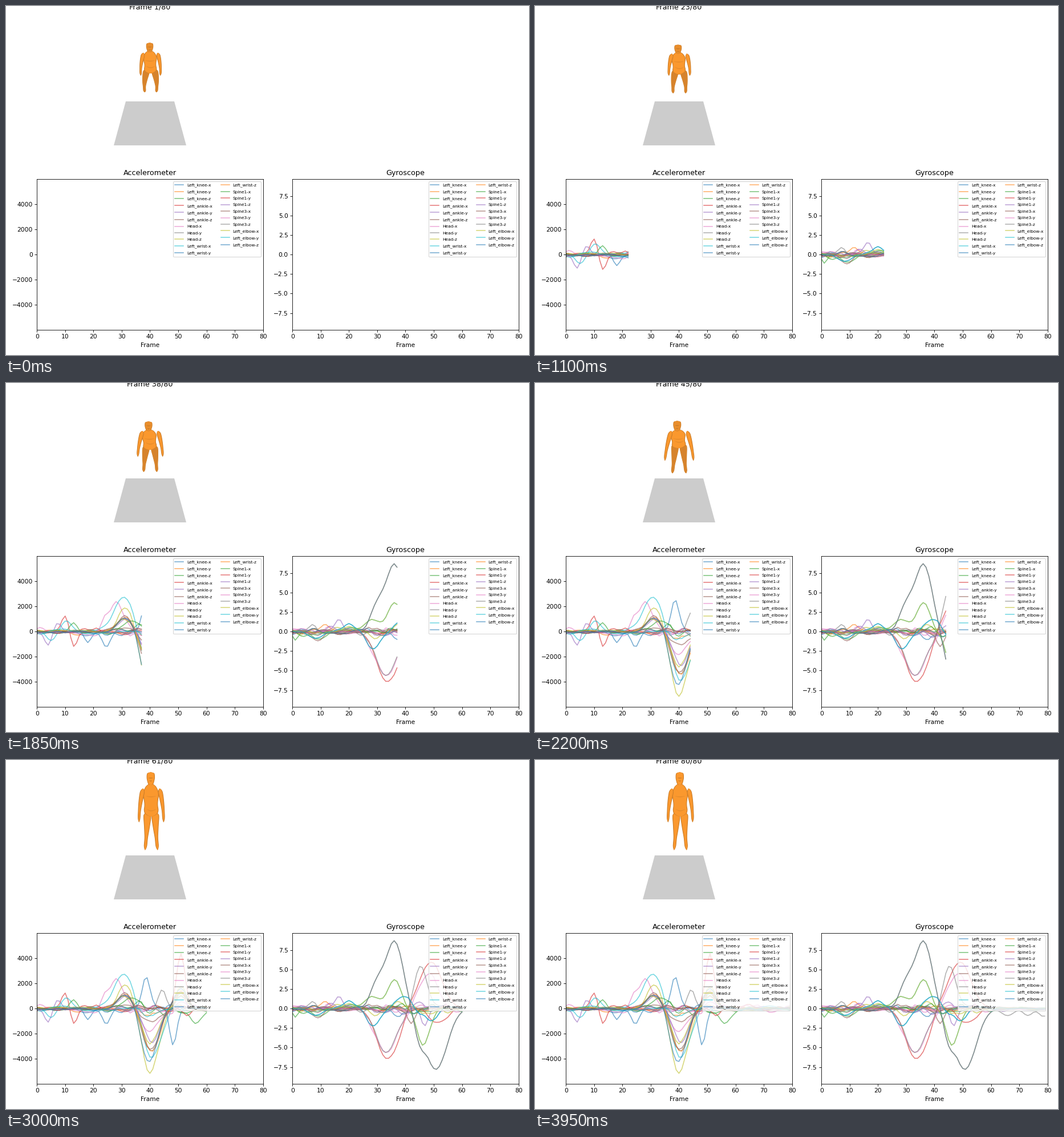
A matplotlib script that plays this animation: 917 by 611 pixels, repeating every 4 s.

```python
import numpy as np
import matplotlib.pyplot as plt
from matplotlib.animation import FuncAnimation
from matplotlib.collections import PolyCollection

W, H, DPI, N = 917, 611, 76.4, 80
SENSORS = ["Left_knee", "Left_ankle", "Head", "Left_wrist", "Spine1", "Spine3", "Left_elbow"]
LABELS = [f"{s}-{a}" for s in SENSORS for a in "xyz"]
T = np.arange(N)
rng = np.random.default_rng(7)


def ease(u):
    u = np.clip(u, 0, 1)
    return u * u * (3 - 2 * u)


def bump(t, width, height):
    return height * np.exp(-((T - t) / width) ** 2 / 2)


def noise(base, burst):
    """One smooth random wave per label, livelier around the stand-up."""
    level = base + bump(42, 9, burst)
    kernel = np.array([0.3, 0.55, 0.55, 0.3])
    return {s: level * np.convolve(rng.normal(size=N + 3), kernel, "valid") for s in LABELS}


def add_bumps(data, bumps):
    for name, parts in bumps.items():
        data[name] = 0.5 * data[name] + sum(bump(*p) for p in parts)


# Standing up: each axis rises a little, dips to its own depth and rebounds.
acc = noise(130, 200)
DEPTH = {"Head-z": 5400, "Left_elbow-z": 4100, "Left_wrist-x": 4000, "Left_wrist-z": 3700,
         "Spine3-x": 3500, "Head-y": 3450, "Left_elbow-x": 2850, "Spine1-z": 2450,
         "Head-x": 1650, "Left_ankle-z": 1000}
for name, d in DEPTH.items():
    mid = 40.3 + rng.uniform(-0.7, 0.7)
    add_bumps(acc, {name: [(31.5, 2.8, 0.33 * d), (mid, 2.9, -d), (51, 2, 0.35 * d)]})
add_bumps(acc, {
    "Left_ankle-x": [(10, 1.3, 1250), (13, 1.2, -1250), (51, 1.5, 4300)],
    "Left_ankle-y": [(4, 1.2, -1150), (7.3, 1.2, 600)],
    "Left_wrist-y": [(18, 1.1, -850), (24.5, 1.4, -1300), (38.5, 1.4, 2550), (48.2, 1.3, -3050)],
    "Spine1-x": [(13, 1.3, 700), (33, 2.5, 900), (56, 2.5, -1100)],
    "Spine3-z": [(44.3, 1.5, 1300)]})
acc["Head-x"] += bump(24, 1.2, 1000) + bump(28, 2, 2200)
acc["Left_wrist-x"] += bump(5, 1.5, -700) + bump(10.5, 1.8, 800) + bump(30, 4, 1500)

gyr = noise(0.3, 0.25)
for name in LABELS:
    gyr[name] *= 1 - 0.6 * ease((T - 54) / 6)
add_bumps(gyr, {
    "Left_knee-y": [(11.3, 1.3, 0.9)],
    "Left_knee-z": [(1, 1, -1.3), (9, 2, -1.1)],
    "Left_ankle-x": [(51, 3, -2.1)],
    "Left_ankle-y": [(16.5, 1.3, 1.5), (46.7, 1.4, -2.2)],
    "Left_ankle-z": [(9, 2.2, -1), (42, 1.3, -1.9)],
    "Head-y": [(7.5, 1.2, 0.8), (66, 2, -0.9), (73, 1.5, -0.9), (78.5, 1.5, -1)],
    "Left_wrist-x": [(29, 3.5, 1.6), (36.3, 2.3, 3.4), (46.3, 2.3, -4.5)],
    "Left_wrist-y": [(8, 2, -0.8), (20, 2.2, 1), (28.5, 2.2, -2.3), (39, 2.4, 1.7), (48.5, 2.2, -1.8)],
    "Left_wrist-z": [(30.5, 2.5, 3.3), (36.3, 3, 8.4), (45, 1.8, -3), (51, 3.8, -7.6)],
    "Spine1-y": [(33.8, 4, -6.2), (49, 4, 6)],
    "Spine3-y": [(33.2, 4, -5.6), (48, 3.3, 4.4)],
    "Spine3-z": [(33.5, 4, -5.6), (45.3, 2.2, 5.2)]})
# Wrist and elbow turn together.
for a in "xyz":
    gyr[f"Left_elbow-{a}"] = gyr[f"Left_wrist-{a}"]

# Key poses in pixels; *_w values are distances from the body's middle.
KEYS = [0, 30, 44, 53]
POSES = dict(
    head_x=[252, 250.5, 249.3, 253.8], mid=[253.5, 253, 252.8, 254.8],
    top=[64.5, 68.5, 66.5, 21.5], chin=[80, 83, 83.5, 43],
    sh_w=[13.5, 14, 15, 15.5], sh_y=[86, 88, 88, 54],
    hand_w=[17, 18.5, 25, 21.5], hand_y=[122, 122, 136, 109],
    hip_y=[110, 112, 106, 91],
    knee_w=[10.5, 10.5, 9, 8], knee_y=[133, 134, 132, 122],
    foot_w=[10, 11, 12, 11], foot_y=[151, 153, 158, 157.5])
EDGE, MID, LIGHT, DIM = (np.array(c) / 255 for c in
                         [(196, 122, 42), (226, 138, 43), (250, 152, 46), (214, 131, 44)])


def pose_at(t):
    i = min(np.searchsorted(KEYS, t, "right") - 1, len(KEYS) - 2)
    u = ease((t - KEYS[i]) / (KEYS[i + 1] - KEYS[i]))
    return {k: v[i] + (v[i + 1] - v[i]) * u for k, v in POSES.items()}


def tube(a, b, c, radii, inset=0):
    """Outline of a bent limb that passes through a, b and c."""
    s = np.linspace(0, 1, 30)
    a, b, c = map(np.array, (a, b, c))
    path = (np.outer((1 - s) * (1 - 2 * s), a) + np.outer(4 * s * (1 - s), b)
            + np.outer(s * (2 * s - 1), c))
    pad = np.pad(np.interp(s, np.linspace(0, 1, len(radii)), radii), 2, "edge")
    r = np.convolve(pad, np.ones(5) / 5, "valid")
    r = np.maximum(r - inset, 0) * np.minimum(1, np.sqrt(12 * s * (1 - s) + 0.02))
    d = np.gradient(path, axis=0)
    n = np.c_[-d[:, 1], d[:, 0]] / np.hypot(*d.T)[:, None] * r[:, None]
    return np.r_[path + n, (path - n)[::-1]]


def body(t):
    """Polygons and colours of the figure, back to front."""
    p = pose_at(t)
    size, mid, hx = p["sh_w"] / 15.5, p["mid"], p["head_x"]
    rise = ease((t - 44) / 9)
    verts, cols = [], []

    def add(a, b, c, radii, light=LIGHT):
        for inset, col in ((0, EDGE), (0.6, MID), (1.4, light)):
            verts.append(tube(a, b, c, np.multiply(radii, size), inset))
            cols.append(col)

    def crease(x, y, half, sag, col):
        verts.append(tube((x - half, y), (x, y + sag), (x + half, y), [0.2, 0.7, 0.2]))
        cols.append(col)

    for side in (-1, 1):
        add((mid + side * 7 * size, p["hip_y"]), (mid + side * p["knee_w"], p["knee_y"]),
            (mid + side * p["foot_w"], p["foot_y"]), [6, 7, 6, 5, 4, 2.8, 3, 2.5],
            DIM + (LIGHT - DIM) * rise)
    neck, low = p["chin"] - 3, p["hip_y"] + 8
    cx = (mid + hx) / 2
    add((hx, neck), (cx, (neck + low) / 2), (mid, low), [4.5, 11.5, 14.5, 12.5, 11.5, 13.5, 9])
    crease(cx, p["sh_y"] + 9, 9, 1.5, MID)
    crease(mid, p["hip_y"] - 5, 8, 3, MID)
    for side in (-1, 1):
        elbow = (p["sh_w"] + p["hand_w"]) / 2 + 1.5
        add((mid + side * (p["sh_w"] - 1), p["sh_y"] - 4),
            (mid + side * elbow, (p["sh_y"] + p["hand_y"]) / 2),
            (mid + side * p["hand_w"], p["hand_y"]), [4, 4.2, 3.6, 3, 2.4, 2.5, 1.2])
    brow = p["top"] * 0.55 + p["chin"] * 0.45
    add((hx, p["top"]), (hx, (p["top"] + p["chin"]) / 2), (hx, p["chin"] + 1),
        [6, 7.2, 7.2, 6, 4], MID + (LIGHT - MID) * (0.3 + 0.7 * rise))
    crease(hx, brow, 4, 0.4, EDGE)
    crease(hx, brow + 5, 2.6, 0.6, EDGE)
    return verts, cols


fig = plt.figure(figsize=((W + 1e-6) / DPI, (H + 1e-6) / DPI), dpi=DPI, facecolor="white")
stage = fig.add_axes([0, 0, 1, 1])
stage.set(xlim=(0, W), ylim=(H, 0))
stage.axis("off")
stage.fill([210, 295, 316, 189], [167, 167, 244, 244], color="#cccccc", lw=0)
figure = stage.add_collection(PolyCollection([], linewidths=0))
title = fig.text(252.5 / W, 1 - 5.2 / H, "", fontsize=12, ha="center", va="baseline")


def chart(left, name, limit, data):
    ax = fig.add_axes([left / W, 1 - 567 / H, 396.4 / W, 263.5 / H])
    ax.set(xlim=(0, N), ylim=(-limit, limit), xlabel="Frame")
    ax.set_title(name, pad=6.6)
    lines = [ax.plot([], [], alpha=0.6, label=s)[0] for s in LABELS]
    ax.legend(loc="upper right", ncol=2, fontsize=7, labelspacing=0.7)
    return [(line, data[s]) for line, s in zip(lines, LABELS)]


curves = chart(54.2, "Accelerometer", 5973, acc) + chart(502.2, "Gyroscope", 9.66, gyr)


def draw(i):
    title.set_text(f"Frame {i + 1}/{N}")
    for line, values in curves:
        line.set_data(T[:i + 1], values[:i + 1])
    verts, cols = body(i)
    figure.set_verts(verts)
    figure.set_facecolor(cols)
    return [title, figure]


anim = FuncAnimation(fig, draw, frames=N, interval=50, repeat=True, repeat_delay=0)
plt.show()
```
